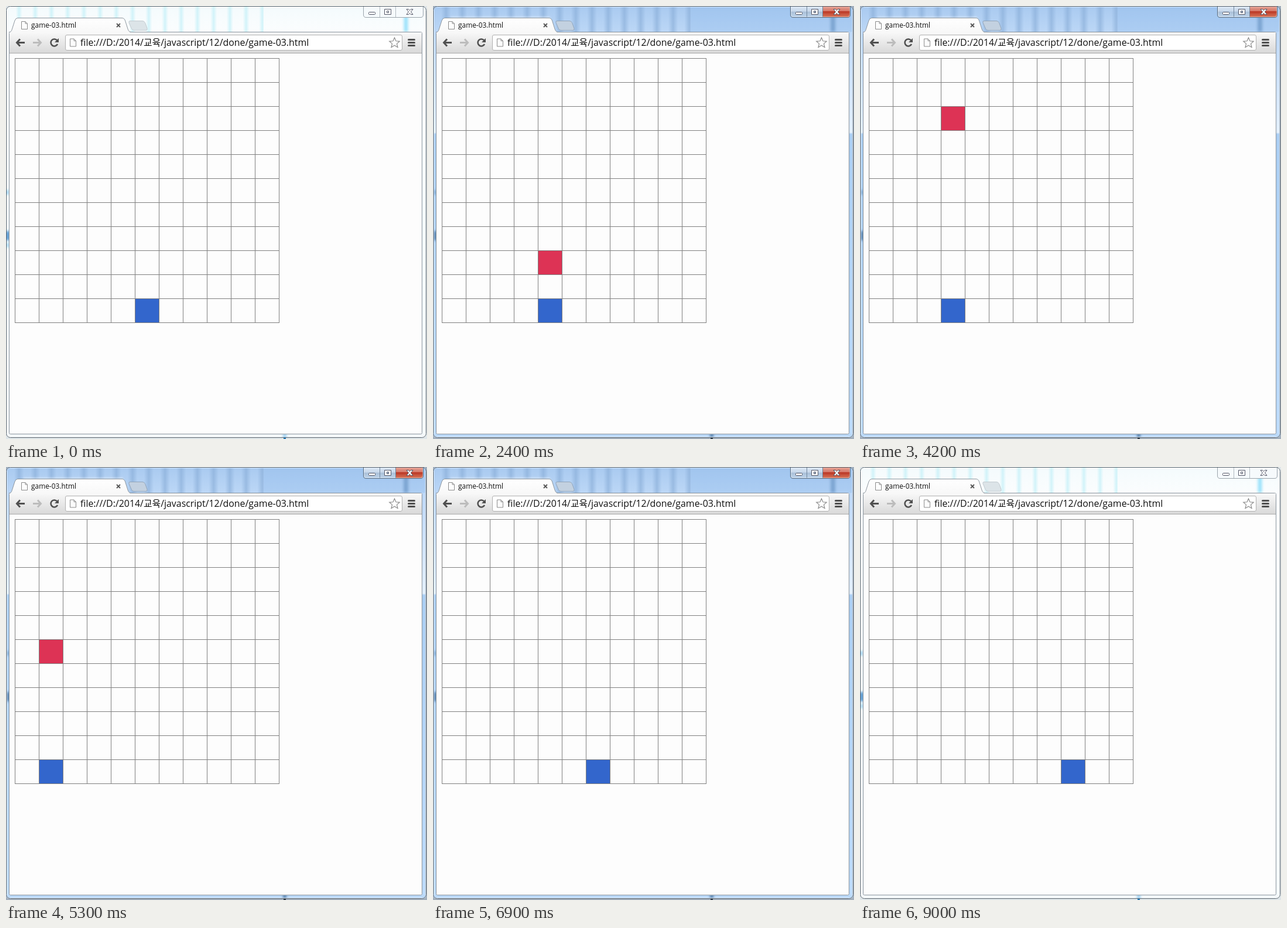
These frames come from a looping animation (719 by 739 pixels, 9.1 s). An HTML page:

```html
<!DOCTYPE html>
<html lang="ko">
<head>
<meta charset="utf-8">
<title>game-03.html</title>
<style>
html, body { margin: 0; width: 719px; height: 739px; overflow: hidden; background: #fff; }
body { position: relative; }
svg { position: absolute; left: 0; top: 0; }
text { font-family: "Open Sans", "Noto Sans CJK KR", "Noto Sans CJK", sans-serif; fill: #111; }

/* One board cell is 1em */
.board {
  position: absolute; left: 15px; top: 89px; width: 452px; height: 452px;
  overflow: hidden; font-size: 41px;
  background:
    repeating-linear-gradient(90deg, gray 0 1px, transparent 1px 41px),
    repeating-linear-gradient(gray 0 1px, transparent 1px 41px);
}
.board i { position: absolute; left: 1px; top: 1px; width: 40px; height: 40px; }
.hero { background: #36c; animation: hero 9.1s step-end infinite; }
.shot { background: #d35; animation: shot 9.1s step-end infinite; }
.focus { animation: focus 9.1s step-end infinite; }

@keyframes focus {
  0%, 98.9%, 100% { opacity: 0; }
  3.29% { opacity: 1; }
}
@keyframes hero {
  0% { translate: 5em 10em; }
  21.97% { translate: 4em 10em; }
  35.16% { translate: 3em 10em; }
  49.45% { translate: 2em 10em; }
  51.64% { translate: 1em 10em; }
  65.93% { translate: 2em 10em; }
  67.03% { translate: 3em 10em; }
  71.42% { translate: 4em 10em; }
  73.62% { translate: 5em 10em; }
  75.82% { translate: 6em 10em; }
  76.92% { translate: 7em 10em; }
  78.02%, 100% { translate: 8em 10em; }
}
/* Row -1 is clipped by the board; paired stops skip a row */
@keyframes shot {
  0% { translate: 5em -1em; }
  8.79% { translate: 5em 8em; animation-timing-function: steps(9); }
  18.68% { translate: 5em -1em; }
  26.37% { translate: 4em 8em; animation-timing-function: steps(4); }
  30.75% { translate: 4em 4em; }
  30.76% { translate: 4em 3em; animation-timing-function: steps(4); }
  35.16% { translate: 4em -1em; }
  40.65% { translate: 3em 8em; animation-timing-function: steps(3); }
  43.94% { translate: 3em 5em; }
  43.95% { translate: 3em 4em; animation-timing-function: steps(5); }
  49.45% { translate: 3em -1em; }
  56.04% { translate: 1em 8em; }
  57.14% { translate: 1em 6em; animation-timing-function: steps(7); }
  64.83% { translate: 1em -1em; }
  82.41% { translate: 8em 8em; animation-timing-function: steps(4); }
  86.8% { translate: 8em 4em; }
  86.81% { translate: 8em 3em; animation-timing-function: steps(4); }
  91.2%, 100% { translate: 8em -1em; }
}
</style>
</head>
<body>
<svg width="719" height="739" viewBox="0 0 719 739">
  <defs>
    <linearGradient id="pale" x2="0" y2="1">
      <stop stop-color="#f4fbfd"/><stop offset=".06" stop-color="#fbfdfe"/>
      <stop offset=".5" stop-color="#f3fafc"/><stop offset="1" stop-color="#f4f8fa"/>
    </linearGradient>
    <linearGradient id="glass" x2="0" y2="1">
      <stop stop-color="#a9caf0"/><stop offset=".06" stop-color="#bcd7f6"/>
      <stop offset=".292" stop-color="#e2eefb"/><stop offset=".296" stop-color="#a9cdf2"/>
      <stop offset="1" stop-color="#bcdaf9"/>
    </linearGradient>
    <linearGradient id="paleBars" gradientUnits="userSpaceOnUse" x1="230" x2="257.7" spreadMethod="repeat">
      <stop offset=".3" stop-color="#c5f0f8" stop-opacity="0"/>
      <stop offset=".5" stop-color="#c5f0f8"/>
      <stop offset=".7" stop-color="#c5f0f8" stop-opacity="0"/>
    </linearGradient>
    <linearGradient id="bars" gradientUnits="userSpaceOnUse" x1="230" x2="257.7" spreadMethod="repeat">
      <stop offset=".2" stop-color="#86abd6" stop-opacity="0"/>
      <stop offset=".5" stop-color="#86abd6" stop-opacity=".6"/>
      <stop offset=".8" stop-color="#86abd6" stop-opacity="0"/>
    </linearGradient>
    <linearGradient id="tool" x2="0" y2="1">
      <stop stop-color="#f8f8f8"/><stop offset="1" stop-color="#d9d9d9"/>
    </linearGradient>
    <linearGradient id="tab" x2="0" y2="1">
      <stop stop-color="#fff"/><stop offset="1" stop-color="#f8f8f8"/>
    </linearGradient>
    <linearGradient id="key" x2="0" y2="1">
      <stop stop-color="#dfeaf6"/><stop offset=".48" stop-color="#c6d7ea"/>
      <stop offset=".5" stop-color="#a9bfd7"/><stop offset="1" stop-color="#c0d6ec"/>
    </linearGradient>
    <linearGradient id="stop" x2="0" y2="1">
      <stop stop-color="#e8aa9d"/><stop offset=".48" stop-color="#d37364"/>
      <stop offset=".5" stop-color="#bb3725"/><stop offset="1" stop-color="#d8765a"/>
    </linearGradient>
    <filter id="soft" x="-100%" y="-100%" width="300%" height="300%"><feGaussianBlur stdDeviation="2"/></filter>
    <clipPath id="frame"><rect width="718" height="737" rx="7"/></clipPath>
    <path id="tabShape" d="M5 44.5C9 44.5 9.500 42 10.500 39L15 25Q16.500 20.500 20 20.500H198Q202 20.500 203.500 25L208 39Q209.500 44.500 214 44.500"/>
    <path id="plus" d="M212 25.500H233Q236 25.500 237.500 28.500L241 38Q242 41.500 239 41.500H219Q215.500 41.500 214.500 39L210 28.500Q209 25.500 212 25.500Z"/>
    <path id="keys" d="M610.500 0V15Q610.500 19.500 615 19.500H708Q712.500 19.500 712.500 15V0"/>
    <g id="page" fill="#fdfdfd" stroke="#8b8b8b">
      <path d="M.5 .5H7L10.500 4V13.500H.5Z"/><path d="M7 .5V4H10.500" fill="none"/>
    </g>
  </defs>

  <!-- Window without focus -->
  <rect width="719" height="739" fill="#dfe6e9"/>
  <g clip-path="url(#frame)">
    <rect width="719" height="739" fill="url(#pale)"/>
    <rect width="440" height="44" fill="url(#paleBars)" opacity=".75"/>
    <g filter="url(#soft)">
      <path d="M683 0V44" stroke="#9ce2fb" stroke-width="7"/>
      <path d="M2 314V322M476 729V739" stroke="#8fcaf0" stroke-width="5"/>
      <path d="M3 384V400" stroke="#3f8bcb" stroke-width="6"/>
      <path d="M3 404V412" stroke="#9cd2f4" stroke-width="5"/>
    </g>
  </g>
  <path d="M474 738H478" stroke="#2779b5" stroke-width="2"/>
  <use href="#plus" fill="#dce4e8" stroke="#c3cbd0"/>
  <use href="#keys" fill="#f6fafc" stroke="#9ba4ab"/>
  <path d="M638.500 1V19M665.500 1V19" stroke="#b3bbc1"/>

  <!-- Window with focus -->
  <g class="focus">
    <rect width="719" height="739" fill="#a3afbc"/>
    <g clip-path="url(#frame)">
      <rect width="719" height="739" fill="url(#glass)"/>
      <rect width="440" height="44" fill="url(#bars)"/>
      <rect x="440" width="278" height="44" fill="#91bbec" opacity=".35"/>
      <g filter="url(#soft)">
        <path d="M683 0V44" stroke="#7da5d1" stroke-width="8"/>
        <path d="M30 32H200" stroke="#fff" stroke-width="26" opacity=".55"/>
        <path d="M2 314V322" stroke="#6f9cc6" stroke-width="5"/>
        <path d="M3 384V400M476 730V739" stroke="#426f9e" stroke-width="5"/>
      </g>
      <path d="M1.500 736V7Q1.500 1.500 7 1.500H711Q716.500 1.500 716.500 7V735.500H1.500" fill="none" stroke="#e6f2fd" opacity=".8"/>
    </g>
    <path d="M474 738H478" stroke="#333f4c" stroke-width="2"/>
    <use href="#plus" fill="#c3d1e0" stroke="#92a5ba"/>
    <use href="#keys" fill="url(#key)" stroke="#54697f"/>
    <path d="M666 0H712V15Q712 19 708 19H666Z" fill="url(#stop)"/>
    <path d="M638.500 0V19M665.500 0V19" stroke="#71869c"/>
    <path d="M611.500 1V15Q611.500 18.500 615 18.500H708Q711.500 18.500 711.500 15V1" fill="none" stroke="#fff" opacity=".4"/>
  </g>

  <rect x=".5" y=".5" width="717" height="736" rx="7" fill="none" stroke="#5a646d"/>

  <!-- Caption glyphs -->
  <g fill="#fff" stroke="#535666">
    <rect x="619.500" y="10.500" width="11" height="4" rx="1"/>
    <path fill-rule="evenodd" d="M646.500 5.500H657.500V14.500H646.500ZM650.500 8.500V11.500H653.500V8.500Z"/>
    <path d="M684 5.500H687.500L689.500 7.700L691.500 5.500H695L691.500 10L695 14.500H691.500L689.500 12.300L687.500 14.500H684L687.500 10Z"/>
  </g>

  <!-- Page, toolbar and tab -->
  <rect x="5.500" y="44.500" width="705" height="686" rx="2" fill="#fdfdfd" stroke="#8b959e"/>
  <rect x="6" y="45" width="704" height="35" fill="url(#tool)"/>
  <path d="M6 80.500H710" stroke="#aaa"/>
  <use href="#tabShape" fill="url(#tab)" stroke="#8d969e"/>
  <path d="M8 45H211" stroke="#f8f8f8" stroke-width="2"/>
  <use href="#page" x="26" y="26"/>
  <text x="43" y="37" font-size="11.900">game-03.html</text>
  <path d="M189 30L195 36M195 30L189 36" stroke="#555" stroke-width="1.800"/>

  <!-- Navigation -->
  <g fill="none" stroke-width="3">
    <path id="back" d="M24 56.500L18.500 62.500L24 68.500M19 62.500H32" stroke="#505050"/>
    <path d="M54 56.500L59.500 62.500L54 68.500M59 62.500H46" stroke="#bcbcbc"/>
    <path d="M87.500 59A6 6 0 1 0 88 65" stroke="#505050" stroke-width="2.600"/>
  </g>
  <path d="M90 55V62H83Z" fill="#505050"/>
  <rect x="101.500" y="49.500" width="575" height="26" rx="2.500" fill="#fff" stroke="#b1b1b1"/>
  <use href="#page" x="109" y="55.500"/>
  <text x="127" y="68" font-size="15.900">file:///D:/2014/교육/javascript/12/done/game-03.html</text>
  <path d="M663.500 54L666 59.800L672.200 60.300L667.500 64.400L669 70.500L663.500 67.200L658 70.500L659.500 64.400L654.800 60.300L661 59.800Z" fill="#fff" stroke="#8c8c8c" stroke-width="1.200"/>
  <path d="M687.500 57.500H697.500M687.500 62.500H697.500M687.500 67.500H697.500" stroke="#505050" stroke-width="3" stroke-linecap="round"/>
</svg>
<div class="board"><i class="hero"></i><i class="shot"></i></div>
</body>
</html>
```
